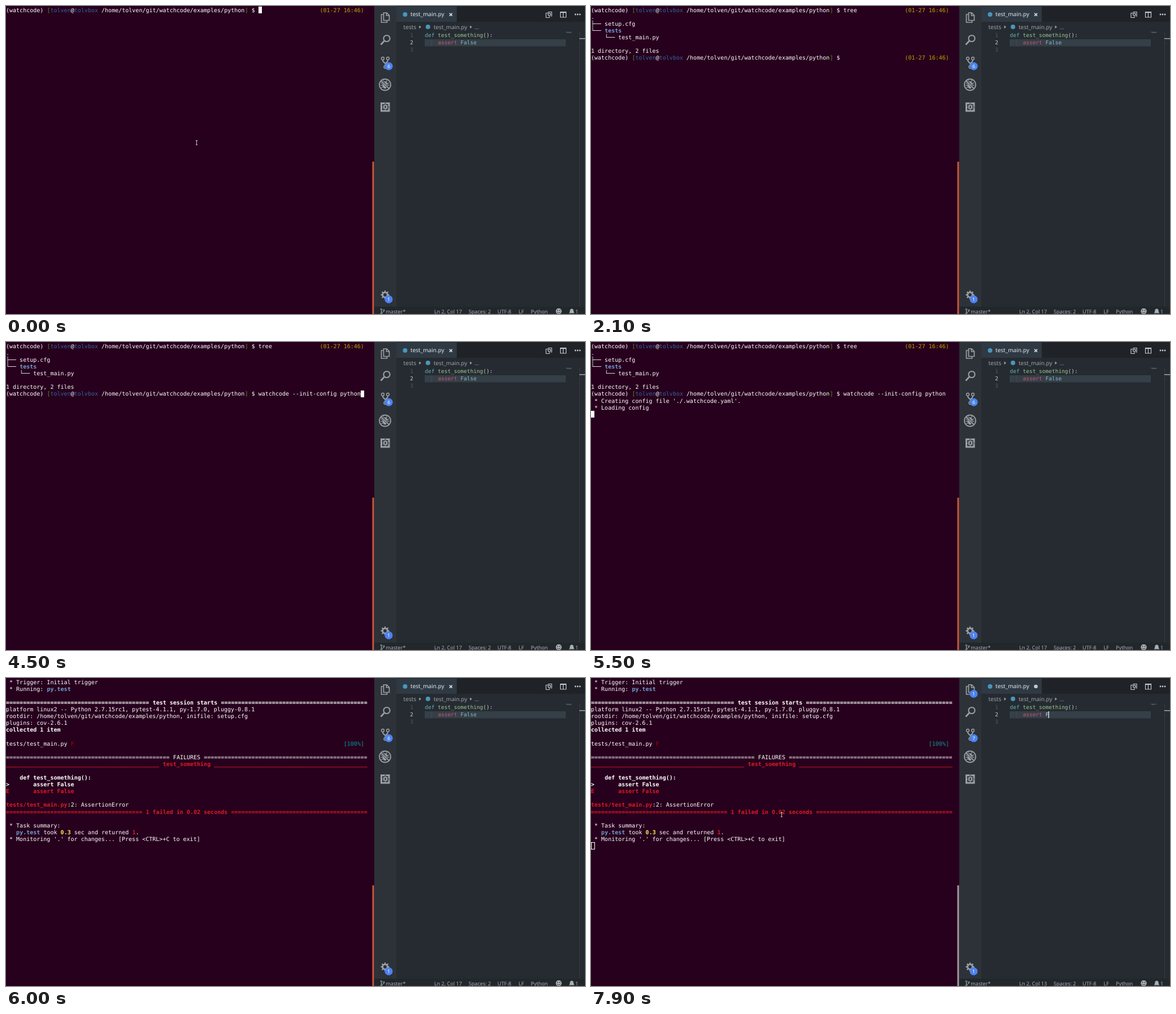
Write an HTML page with a canvas that moves like this. It is 1025 by 546 pixels and loops after 8 s.

```html
<!DOCTYPE html>
<html lang="en">
<head>
<meta charset="utf-8">
<title>Terminal and editor</title>
<style>
  html, body { margin: 0; width: 100%; height: 100%; overflow: hidden; background: #27001d; }
  canvas { display: block; width: 1025px; height: 546px; }
</style>
</head>
<body>
<canvas id="stage" width="1025" height="546"></canvas>
<script>
const ctx = document.getElementById('stage').getContext('2d');
const LOOP = 8000;
const MONO = '"DejaVu Sans Mono", monospace';
const SANS = '"Noto Sans", sans-serif';
const CELL = 6.038, ROW = 12.09, COLUMNS = 106;
const TERM_BG = '#27001d', ICON = '#9a9fa5', BADGE = '#4c83f0';

// Terminal text styles: [colour, bold]
const STYLES = {
  plain: ['#ffffff', false],
  bold: ['#ffffff', true],
  blue: ['#3465a4', false],
  green: ['#4e9a06', false],
  gold: ['#c4a000', false],
  cyan: ['#06989a', false],
  darkRed: ['#b40004', false],
  red: ['#de1a26', true],
  sky: ['#729fcf', true],
  yellow: ['#fce94f', true]
};

const USER = 'tolven', HOST = 'tolvbox';
const PROJECT = `/home/${USER}/git/watchcode/examples/python`;
const COMMAND = 'watchcode --init-config python';
const PROMPT_END = 74;

// Each entry holds from its start time until the next one.
const TREE_TYPED = [[0, 0], [700, 1], [900, 2], [1000, 3], [1500, 4]];
const SEARCH = [[3100, ''], [3500, 'i'], [3700, 'in'], [3800, 'ini'], [4500, null]];
const CODE_LENGTH = [[0, 5], [7400, 4], [7600, 3], [7700, 2], [7900, 1]];
// time, column, row, shape
const CURSOR = [
  [0, 74, 0, 'solid'], [300], [500, 74, 0, 'solid'], [700, 75, 0, 'solid'],
  [900, 76, 0, 'solid'], [1000, 77, 0, 'solid'], [1500, 78, 0, 'solid'],
  [2000, 74, 7, 'solid'], [2100], [2700, 74, 7, 'solid'], [3500, 95, 7, 'solid'],
  [3700, 86, 7, 'solid'], [4500, 104, 7, 'solid'], [5000], [5200, 104, 7, 'solid'],
  [5300, 0, 8, 'solid'], [5500, 0, 10, 'solid'], [5800, 0, 3, 'solid'], [6000],
  [6400, 0, 24, 'solid'], [6700, 0, 24, 'hollow']
];

const latest = (steps, t) => steps.filter(step => step[0] <= t).pop();

function box(x, y, w, h, color) {
  ctx.fillStyle = color;
  ctx.fillRect(x, y, w, h);
}

function label(text, x, y, size, color, family = SANS, weight = '') {
  ctx.font = `${weight} ${size}px ${family}`;
  ctx.fillStyle = color;
  ctx.fillText(text, x, y);
}

function disc(x, y, r, color) {
  ctx.fillStyle = color;
  ctx.beginPath();
  ctx.arc(x, y, r, 0, Math.PI * 2);
  ctx.fill();
}

function ring(x, y, r, width, color = ICON) {
  ctx.strokeStyle = color;
  ctx.lineWidth = width;
  ctx.beginPath();
  ctx.arc(x, y, r, 0, Math.PI * 2);
  ctx.stroke();
}

function stroke(path, width, color = ICON) {
  ctx.strokeStyle = color;
  ctx.lineWidth = width;
  ctx.stroke(new Path2D(path));
}

function fill(path, color = ICON) {
  ctx.fillStyle = color;
  ctx.fill(new Path2D(path));
}

// Parts are strings in the plain style or [text, style] pairs.
function print(row, col, ...parts) {
  for (const part of parts) {
    const [text, style] = Array.isArray(part) ? part : [part, 'plain'];
    const [color, bold] = STYLES[style];
    label(text, col * CELL, 10.8 + row * ROW, 10.03, color, MONO, bold ? 'bold' : '');
    col += text.length;
  }
}

function rule(row, title, mark, markStyle, titleStyle = markStyle) {
  const side = Math.floor((COLUMNS - title.length - 2) / 2);
  const tail = COLUMNS - side - title.length - 2;
  print(row, 0, [mark.repeat(side), markStyle], [` ${title} `, titleStyle], [mark.repeat(tail), markStyle]);
}

function prompt(row, command, clock) {
  print(row, 0, '(watchcode) ', ['[', 'green'], [USER, 'blue'], '@', [HOST, 'blue'],
    ` ${PROJECT}`, [']', 'green'], ` $ ${command}`);
  if (clock) print(row, 92, ['(01-27 16:46)', 'gold']);
}

function drawShell(t) {
  prompt(0, 'tree'.slice(0, latest(TREE_TYPED, t)[1]), true);
  if (t < 2000) return;
  print(1, 0, ['.', 'sky']);
  print(2, 0, '├── setup.cfg');
  print(3, 0, '└── ', ['tests', 'sky']);
  print(4, 4, '└── test_main.py');
  print(6, 0, '1 directory, 2 files');
  prompt(7, t < 3500 ? '' : COMMAND, t < 3500);
  const search = latest(SEARCH, t);
  if (search && search[1] !== null) {
    print(8, 0, `bck-i-search: ${search[1]}_`);
    if (search[1]) {
      const col = latest(CURSOR, t)[1];
      box(col * CELL, 96, search[1].length * CELL, 0.8, '#fff');
    }
  }
  if (t >= 5500) {
    print(8, 0, " * Creating config file './.watchcode.yaml'.");
    print(9, 0, ' * Loading config');
  }
}

function drawTestRun(t) {
  print(0, 0, ' * Trigger: Initial trigger');
  print(1, 0, ' * Running: ', ['py.test', 'sky']);
  if (t < 6000) return;
  rule(3, 'test session starts', '=', 'bold');
  print(4, 0, 'platform linux2 -- Python 2.7.15rc1, pytest-4.1.1, py-1.7.0, pluggy-0.8.1');
  print(5, 0, `rootdir: ${PROJECT}, inifile: setup.cfg`);
  print(6, 0, 'plugins: cov-2.6.1');
  print(7, 0, ['collected 1 item', 'bold']);
  print(9, 0, 'tests/test_main.py ', ['F', 'darkRed']);
  print(9, 99, ['[100%]', 'cyan']);
  rule(11, 'FAILURES', '=', 'plain');
  rule(12, 'test_something', '_', 'red');
  print(14, 4, ['def test_something():', 'bold']);
  print(15, 0, ['>       assert False', 'bold']);
  print(16, 0, ['E       assert False', 'red']);
  print(18, 0, ['tests/test_main.py', 'red'], ':2: AssertionError');
  rule(19, '1 failed in 0.02 seconds', '=', 'red');
  print(21, 0, ' * Task summary:');
  print(22, 3, ['py.test', 'sky'], ' took ', ['0.3', 'yellow'], ' sec and returned ', ['1', 'red'], '.');
  print(23, 0, " * Monitoring '.' for changes... [Press <CTRL>+C to exit]");
}

function drawCursor(t) {
  const [, col, row, shape] = latest(CURSOR, t);
  if (!shape) return;
  const x = Math.round(col * CELL), y = Math.round(1 + row * ROW);
  if (shape === 'hollow') {
    ctx.strokeStyle = '#fff';
    ctx.lineWidth = 1;
    ctx.strokeRect(x + 0.5, y + 0.5, 6, 12);
    return;
  }
  box(x, y, 6, 12, '#fff');
  if (t >= 3500 && t < 4500) {
    label(COMMAND[col - PROMPT_END], col * CELL, 10.8 + row * ROW, 10.03, TERM_BG, MONO);
  }
}

function drawTerminal(t) {
  box(0, 0, 652, 546, TERM_BG);
  if (t < 5800) drawShell(t); else drawTestRun(t);
  drawCursor(t);
  const top = t < 5800 ? 276 : 367.5;
  box(648.5, top, 3, 546 - top, t < 6900 ? '#c75c3a' : '#a39da0');
  if (t < 500 || t >= 6900) {
    stroke('M335.8 238.5H339.2M337.5 238.5V246M335.8 246H339.2', 1, '#b9d0b4');
  }
}

function badge(x, y, text) {
  disc(x, y, 7, BADGE);
  ctx.textAlign = 'center';
  label(text, x, y + 3, 8.5, '#fff');
  ctx.textAlign = 'left';
}

function drawActivityBar(t) {
  box(652, 0, 39, 546, '#2d3239');
  stroke('M668.5 12H674L678.5 16.5V25.5H668.5ZM673.5 12V17H678.5M668 15H664.5V29H674.5V26', 1.7);

  ring(674, 57.5, 5.6, 2);
  stroke('M669.8 61.7L663.5 68.5', 2.8);

  for (const [x, y] of [[667, 93], [676, 93], [671.5, 108]]) ring(x, y, 2.4, 1.5);
  stroke('M667 95.5Q667 99 671.5 101.5V105.5M676 95.5Q676 99 671.5 101.5', 2);

  fill('M671 133.5C677 133.5 676.5 146.5 671 146.5C665.5 146.5 665 133.5 671 133.5Z');
  stroke('M664 136L667 138M663.5 140.5H667M664.5 145L667.5 143M678 136L675 138M678.5 140.5H675M677.5 145L674.5 143M669 134L667.5 132M673 134L674.5 132', 1.3);
  stroke('M664.5 132L678 147', 3.6, '#2d3239');
  ring(671, 139.5, 10, 1.8);
  stroke('M664 132.5L678 146.5', 1.8);

  stroke('M670 172.5H664.5V186H678V181M673 172.5H678V178', 3);
  stroke('M669 176.5H674V181.5H669Z', 2.2);
  stroke('M671.5 170.5V175M671.5 183V187M663 179.5H667M676 179.5H680', 1.5);

  ring(671, 512, 4.3, 2.8);
  for (let i = 0; i < 8; i++) {
    ctx.save();
    ctx.translate(671, 512);
    ctx.rotate(i * Math.PI / 4);
    box(-1.2, -7.5, 2.4, 3, ICON);
    ctx.restore();
  }

  badge(677.7, 106.7, t < 7200 ? '6' : '7');
  badge(677.5, 520, '1');
  if (t >= 7500) badge(677.5, 28, '1');
}

function drawHeader(t) {
  box(691, 0, 334, 28, '#1f2328');
  box(691, 1, 107, 27, '#2f3943');
  disc(706.5, 15, 4, '#4797ba');
  label('test_main.py', 716, 18.3, 10.05, '#e4e8ec');
  if (t < 7400) stroke('M785 12.7L790 17.7M790 12.7L785 17.7', 1.6, '#e4e8ec');
  else disc(787.5, 15, 3.3, '#c3c8cd');

  const bright = '#c5c9ce';
  stroke('M959.5 12.5H956V20.5H962V18M960 11.5V10.5H966V18H964.5', 1.2, bright);
  ring(961.8, 14.8, 2.2, 1.2, bright);
  stroke('M981.5 11H991.5V20H981.5ZM986.5 11V20', 1.2, bright);
  box(981, 10, 11, 2.2, bright);
  for (const x of [1008, 1012, 1016]) disc(x, 15, 1.4, bright);

  const crumb = '#9ba3ab';
  label('tests', 703.5, 40.7, 10.2, crumb);
  fill('M731.5 34.5L735 37.2L731.5 40Z', crumb);
  disc(747, 37, 4, '#4797ba');
  label('test_main.py', 757, 40.7, 10, crumb);
  fill('M821.5 34.5L825 37.2L821.5 40Z', crumb);
  label('…', 829.5, 40.7, 10, crumb);
}

function drawCode(t) {
  const left = 741.6, advance = 5.72, count = latest(CODE_LENGTH, t)[1];
  const code = (text, col, line, color) =>
    label(text, left + col * advance, 55.3 + line * 12.6, 9.5, color, MONO);

  box(741.5, 59, 249.5, 12.4, '#353f48');
  box(742, 59, 0.7, 12.4, '#434d56');
  box(753, 59, 0.7, 12.4, '#434d56');
  code('def', 0, 0, '#5fb3b3');
  code('test_something', 4, 0, '#99c794');
  code('():', 18, 0, '#c5cbd3');
  code('assert', 4, 1, '#cc566f');
  code('False'.slice(0, count), 11, 1, count === 5 ? '#82bac8' : '#c5cbd3');
  if (t >= 7000) box(Math.round(left + (11 + count) * advance) - 0.5, 59, 1.4, 12, '#e8eaed');

  ctx.textAlign = 'right';
  for (let line = 0; line < 3; line++) {
    label(line + 1, 721, 55.3 + line * 12.6, 9.5, line === 1 ? '#c5cbd3' : '#4d565f', MONO);
  }
  ctx.textAlign = 'left';

  box(991, 45.8, 10, 0.9, '#626d70');
  box(993, 47.2, 3 + count, 0.8, '#59535e');
  box(1015, 45, 0.8, 488, '#3b424a');
  box(1015, 57, 10, 1.5, '#a6abaf');
}

function drawStatus(t) {
  const color = '#a9afb6', base = 544.9;
  box(652, 533, 373, 13, '#22272c');
  ring(664.5, 538, 1.3, 1, color);
  ring(664.5, 545, 1.3, 1, color);
  ring(669, 539.5, 1.3, 1, color);
  stroke('M664.5 539.5V543.5M669 541Q668.5 543 665 543', 1, color);
  label('master*', 672.3, base, 9.1, color);
  label(`Ln 2, Col ${12 + latest(CODE_LENGTH, t)[1]}`, 758, base, 9.1, color);
  label('Spaces: 2', 819, base, 9.1, color);
  label('UTF-8', 870, base, 9.1, color);
  label('LF', 907.5, base, 9.1, color);
  label('Python', 929, base, 9.1, color);
  disc(978.5, 541, 5.2, color);
  disc(976.5, 539.5, 0.9, '#22272c');
  disc(980.5, 539.5, 0.9, '#22272c');
  stroke('M975.7 542.5Q978.5 546 981.3 542.5', 1, '#22272c');
  fill('M996.5 544.5Q998.3 543 998.3 540Q998.5 537 1001.5 536.5Q1004.5 537 1004.7 540Q1004.7 543 1006.5 544.5Z', color);
  label('1', 1008, base, 9.1, color);
}

function draw() {
  const t = performance.now() % LOOP;
  ctx.textRendering = 'geometricPrecision';
  drawTerminal(t);
  box(691, 0, 334, 546, '#262b31');
  drawHeader(t);
  drawCode(t);
  drawStatus(t);
  ctx.save();
  ctx.beginPath();
  ctx.rect(652, 0, 39, 533);
  ctx.clip();
  drawActivityBar(t);
  ctx.restore();
  requestAnimationFrame(draw);
}

draw();
</script>
</body>
</html>
```
